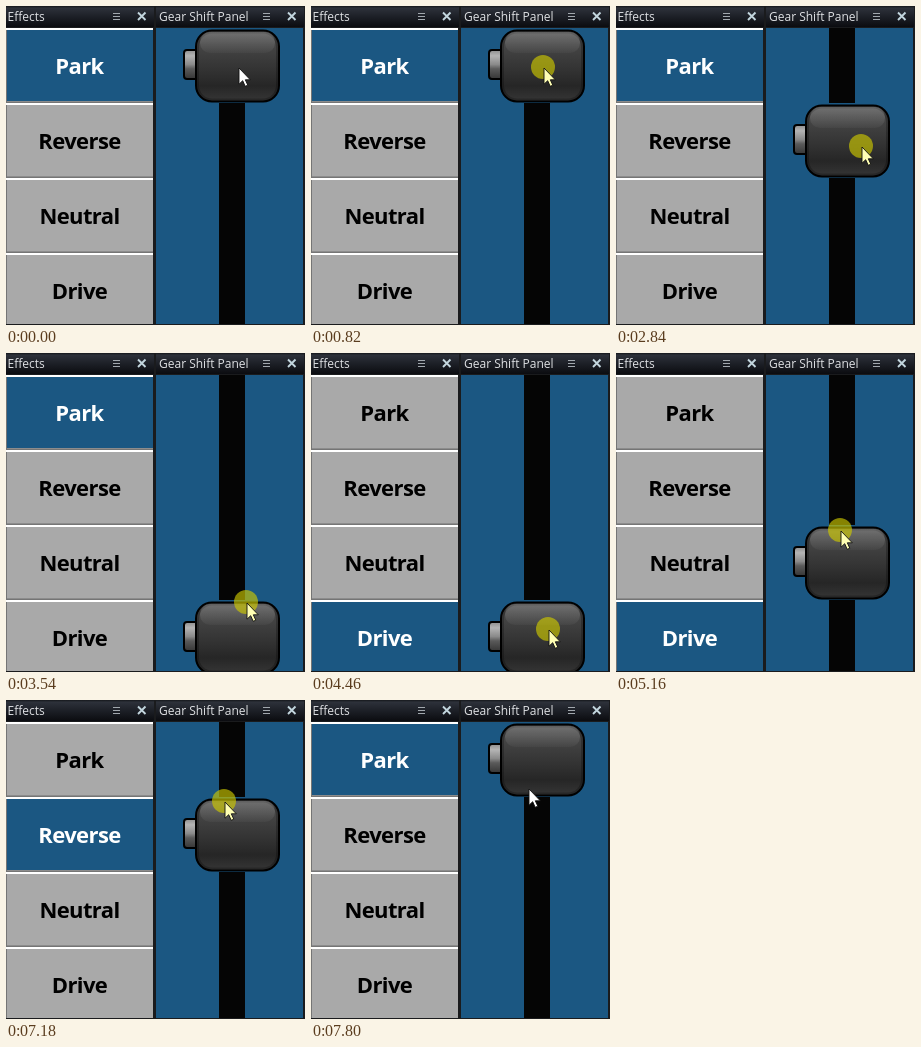
Write an HTML page that moves like this. It is 299x319 px and loops after 8960 ms.

```html
<!DOCTYPE html>
<html lang="en">
<head>
<meta charset="utf-8">
<title>Gear Shift Panel</title>
<style>
  html, body { margin: 0; width: 100%; height: 100%; overflow: hidden; background: #1a1b1d; }
  svg { display: block; width: 299px; height: 319px; }
  .title { font: 12px "Open Sans", "Noto Sans", sans-serif; fill: #dfe1e4; }
  .gear text { font: bold 22px "Open Sans", "Noto Sans", sans-serif; letter-spacing: -.6px; text-anchor: middle; fill: #000; }
  .gear .face { fill: #a9a9a9; }
  .gear.on .face { fill: #1b5782; }
  .gear.on text { fill: #fff; }
  #arrow { fill: #fff; }
  .down #arrow { fill: #ffffb4; }
  #press { visibility: hidden; }
  .down #press { visibility: visible; }
</style>
</head>
<body>
<svg viewBox="0 0 299 319">
  <defs>
    <linearGradient id="bar" x2="0" y2="1">
      <stop offset="0" stop-color="#15171b"/>
      <stop offset=".1" stop-color="#2d313a"/>
      <stop offset=".5" stop-color="#1d2027"/>
      <stop offset="1" stop-color="#0b0c10"/>
    </linearGradient>
    <linearGradient id="body" x2="0" y2="1">
      <stop offset="0" stop-color="#4e4e4e"/>
      <stop offset=".3" stop-color="#404040"/>
      <stop offset=".55" stop-color="#333"/>
      <stop offset=".78" stop-color="#262626"/>
      <stop offset="1" stop-color="#363636"/>
    </linearGradient>
    <linearGradient id="shine" x2="0" y2="1">
      <stop offset="0" stop-color="#fff" stop-opacity=".2"/>
      <stop offset="1" stop-color="#fff" stop-opacity=".03"/>
    </linearGradient>
    <linearGradient id="side" x2="0" y2="1">
      <stop offset="0" stop-color="#8e8e8e"/>
      <stop offset=".2" stop-color="#b4b4b4"/>
      <stop offset=".5" stop-color="#8a8a8a"/>
      <stop offset=".65" stop-color="#5a5a5a"/>
      <stop offset="1" stop-color="#363636"/>
    </linearGradient>
    <clipPath id="panel"><rect x="150" y="22" width="147" height="296"/></clipPath>
    <clipPath id="list"><rect y="22" width="148" height="296"/></clipPath>
    <g id="tools" fill="none">
      <path d="M107 7.5h7M107 10.5h7M107 13.5h7" stroke="#a2a8ae"/>
      <path d="M132 6.5l7.5 7.5M139.500 6.5l-7.500 7.5" stroke="#c3d6de" stroke-width="1.9"/>
    </g>
  </defs>

  <rect width="299" height="319" fill="#1a1b1d"/>
  <rect width="148" height="21" fill="url(#bar)"/>
  <rect x="150" width="148" height="21" fill="url(#bar)"/>
  <text class="title" x="1.500" y="15">Effects</text>
  <text class="title" x="153" y="15">Gear Shift Panel</text>
  <use href="#tools"/>
  <use href="#tools" x="150"/>

  <g id="gears" clip-path="url(#list)"></g>

  <g clip-path="url(#panel)">
    <rect x="150" y="22" width="147" height="296" fill="#1b5782"/>
    <rect x="213" y="22" width="26" height="296" fill="#050505"/>
    <g id="knob">
      <rect x="177" y="22" width="97" height="75" fill="#1b5782"/>
      <rect x="178" y="44" width="16" height="29" rx="3" fill="url(#side)" stroke="#000" stroke-width="2"/>
      <rect x="190" y="24.5" width="83" height="71" rx="16" fill="url(#body)" stroke="#000" stroke-width="2"/>
      <rect x="192" y="26.5" width="79" height="67" rx="14" fill="none" stroke="#000" stroke-opacity=".25" stroke-width="2"/>
      <rect x="194" y="26" width="75" height="21" rx="10" fill="url(#shine)"/>
    </g>
  </g>

  <g id="mouse">
    <circle id="press" r="12" fill="#cdc800" fill-opacity=".65"/>
    <path id="arrow" transform="translate(1 1)" d="M0 0v16.2l3.7-3.5 2.5 5.6 2.6-1.1-2.5-5.4h5z"
      stroke="#111" stroke-width=".9" stroke-linejoin="round"/>
  </g>
</svg>
<script>
  const LOOP = 8960, START = 820, TICK = 77.56;
  const $ = id => document.getElementById(id);

  const gears = ["Park", "Reverse", "Neutral", "Drive"];
  $("gears").innerHTML = gears.map((name, i) => `
    <g class="gear" transform="translate(0 ${22 + 75 * i})">
      <rect width="147" height="75" fill="#757575"/>
      <rect width="147" height="2" fill="#fff"/>
      <rect class="face" x="1" y="2" width="146" height="72"/>
      <rect x="1" y="73" width="146" height="1" fill="#8c8c8c"/>
      <text x="73.5" y="46">${name}</text>
    </g>`).join("");
  const rows = [...document.querySelectorAll(".gear")];

  // Pointer path: [tick, x, y]
  const path = [
    [0, 232, 61], [11, 232, 61], [13, 233, 65], [18, 233, 65], [19, 234, 75],
    [20, 234, 75], [23, 239, 98], [26, 245, 140], [32, 243, 224], [35, 240, 249],
    [38, 237, 276], [50, 237, 276], [54, 225, 190], [55, 225, 190], [57, 222, 164],
    [58, 222, 164], [59, 221, 159], [78, 221, 159], [81, 219, 112], [83, 217, 89],
    [85, 217, 89], [86, 217, 88]
  ];
  const presses = [[0, 40], [47, 64], [73, 89]];
  const picks = [[90, 0], [65, 1], [41, 3], [-99, 0]];

  function pointAt(tick) {
    const i = path.findIndex(p => p[0] > tick);
    if (i === 0) return path[0].slice(1);
    if (i < 0) return path[path.length - 1].slice(1);
    const a = path[i - 1], b = path[i];
    const k = (tick - a[0]) / (b[0] - a[0]);
    return [1, 2].map(n => Math.round(a[n] + (b[n] - a[n]) * k));
  }

  function draw(now) {
    const tick = Math.floor((now % LOOP - START) / TICK + 0.1);
    const [x, y] = pointAt(tick);
    const slot = Math.floor((y - 21) / 75);
    const picked = picks.find(p => tick >= p[0])[1];
    const down = presses.some(([from, to]) => tick >= from && tick < to);
    $("mouse").setAttribute("transform", `translate(${x} ${y})`);
    $("mouse").classList.toggle("down", down);
    $("knob").setAttribute("transform", `translate(0 ${75 * slot})`);
    rows.forEach((row, i) => row.classList.toggle("on", i === picked));
  }

  function frame() {
    draw(performance.now());
    requestAnimationFrame(frame);
  }
  frame();
</script>
</body>
</html>
```
